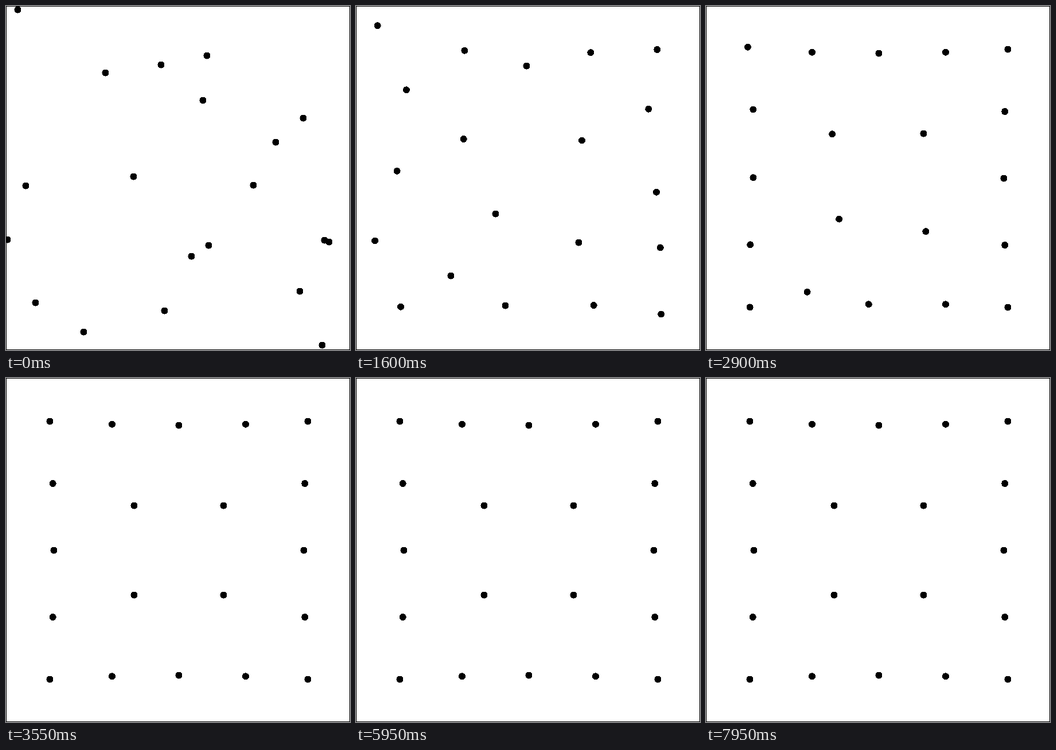
Write an HTML page that moves like this. It is 600 by 600 pixels and loops after 8000 ms.

```html
<!DOCTYPE html>
<html lang="en">
<head>
<meta charset="utf-8">
<title>Dots spreading out</title>
<style>
  html, body { margin: 0; width: 100%; height: 100%; overflow: hidden; background: #fff; }
  svg { display: block; width: 600px; height: 600px; }
</style>
</head>
<body>
<svg id="stage" viewBox="0 0 600 600" shape-rendering="crispEdges">
  <rect x="0.5" y="0.5" width="599" height="599" fill="none" stroke="#000"/>
</svg>
<script>
const LOOP = 8000, STEP = 50, BURST = 900;

const easeOut = u => u * (2 - u);
const smooth = u => u * u * (3 - 2 * u);
const progress = (t, begin, end) => Math.min(1, Math.max(0, (t - begin) / (end - begin)));
const mix = (a, b, u) => a.map((v, i) => v + (b[i] - v) * u);

// Seats lie on columns and rows -2 to 2: a square with bowed sides around a smaller square.
function offset(a, b) {
  if (Math.abs(a) === 2) return Math.sign(a) * (218 + 7 * b * b / 4);
  return a * (Math.abs(b) === 2 ? 116.5 : 78);
}
const seat = (col, row) => [301 + offset(col, row), 300 + offset(row, col)];

// All dots burst apart from their start to a turning point, then reach their seats in waves.
// Each dot: start, turning point, seat.
const waves = [
  { begin: BURST, end: 2300, ease: easeOut, dots: [
    [[270, 102], [202, 68], seat(-1, -2)],
    [[343, 164], [285, 170], seat(0, -2)],
    [[350, 86], [383, 82], seat(1, -2)],
    [[518, 195], [521, 77], seat(2, -2)],
    [[470, 237], [477, 166], seat(2, -1)],
    [[555, 408], [537, 397], seat(2, 0)],
    [[563, 411], [559, 434], seat(2, 1)],
    [[551, 591], [549, 573], seat(2, 2)],
    [[512, 497], [404, 527], seat(1, 2)],
    [[431, 312], [437, 270], seat(1, -1)]
  ] },
  { begin: BURST, end: 3300, ease: smooth, dots: [
    [[20, 6], [27, 23], seat(-2, -2)],
    [[173, 116], [89, 136], seat(-2, -1)],
    [[34, 313], [68, 284], seat(-2, 0)],
    [[2, 407], [20, 407], seat(-2, 1)],
    [[51, 517], [78, 524], seat(-2, 2)],
    [[222, 297], [178, 234], seat(-1, -1)]
  ] },
  { begin: 2300, end: 3400, ease: smooth, dots: [
    [[135, 568], [165, 470], seat(-1, 2)],
    [[276, 531], [260, 522], seat(0, 2)],
    [[323, 436], [243, 362], seat(-1, 1)],
    [[353, 417], [388, 412], seat(1, 1)]
  ] }
];

const stage = document.getElementById('stage');
function addCircle() {
  const circle = document.createElementNS(stage.namespaceURI, 'circle');
  circle.setAttribute('r', 6);
  return stage.appendChild(circle);
}
const movers = waves.flatMap(({ begin, end, ease, dots }) =>
  dots.map(([start, turn, goal]) => ({
    circle: addCircle(),
    at: t => t < BURST
      ? mix(start, turn, easeOut(t / BURST))
      : mix(turn, goal, ease(progress(t, begin, end)))
  })));

function draw(elapsed) {
  const t = Math.floor(elapsed % LOOP / STEP) * STEP;
  for (const { circle, at } of movers) {
    const [x, y] = at(t);
    circle.setAttribute('cx', x + 0.5);
    circle.setAttribute('cy', y + 0.5);
  }
}

let origin;
function tick(now) {
  origin ??= now;
  draw(now - origin);
  requestAnimationFrame(tick);
}
draw(0);
requestAnimationFrame(tick);
</script>
</body>
</html>
```
